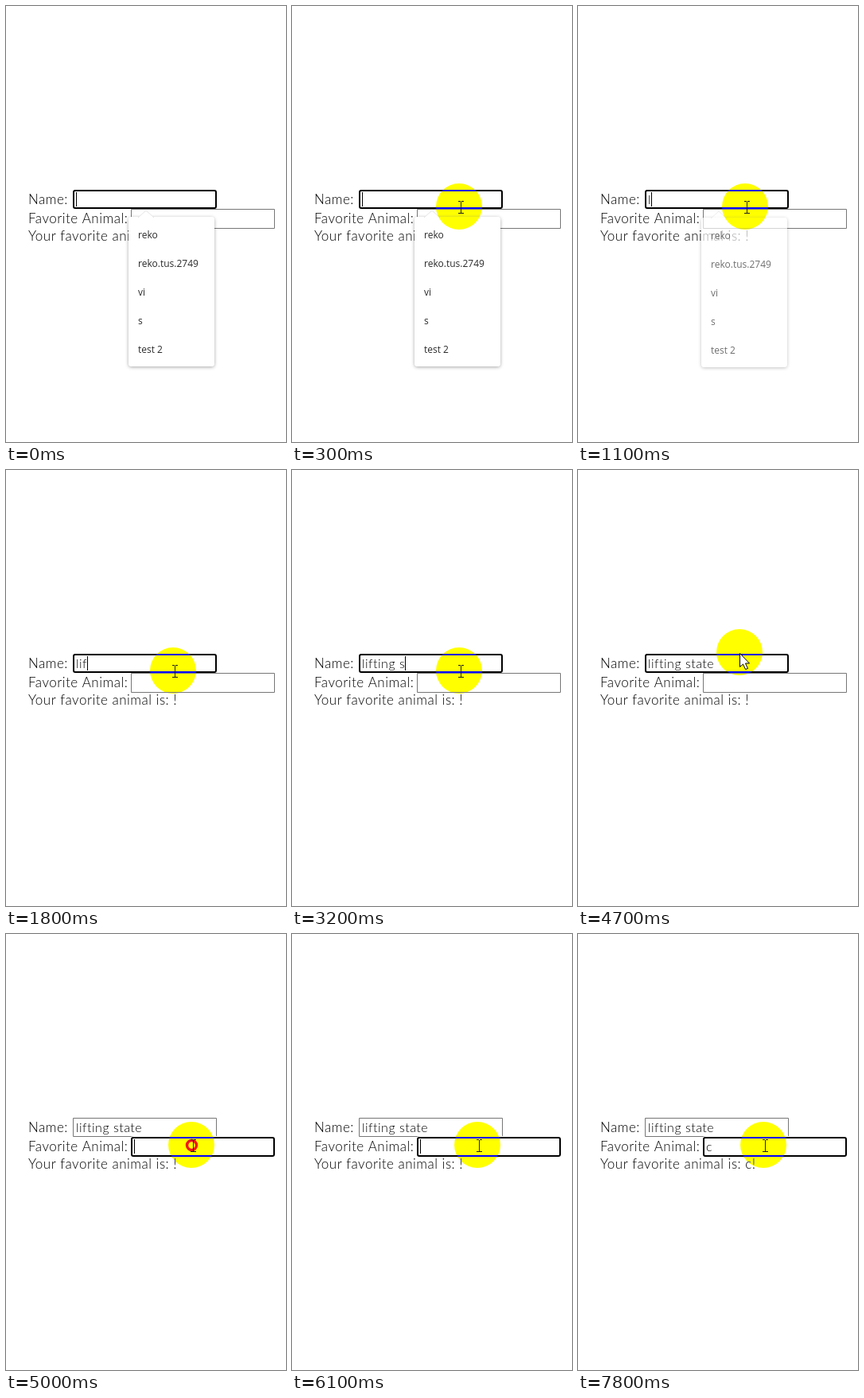
Write an HTML page with a canvas that moves like this. It is 352 by 548 pixels and loops after 8000 ms.

```html
<!DOCTYPE html>
<html lang="en">
<head>
<meta charset="utf-8">
<title>Two inputs</title>
<style>
html, body { margin: 0; height: 100%; overflow: hidden; background: #fff; }
canvas { display: block; }
</style>
</head>
<body>
<canvas id="stage" width="352" height="548"></canvas>
<script>
const ctx = document.getElementById('stage').getContext('2d');
const LOOP = 8000, STEP = 100, FOCUS_TIME = 4900;

const nameField = { x: 84, y: 231, w: 181, h: 24 };
const animalField = { x: 157, y: 255, w: 181, h: 25 };
const suggestions = ['reko', 'reko.tus.2749', 'vi', 's', 'test 2'];

// [time, typed text]
const nameKeys = [[0, ''], [1000, 'l'], [1600, 'li'], [1800, 'lif'], [2200, 'lift'], [2300, 'lifti'],
  [2500, 'liftin'], [2700, 'lifting'], [2800, 'lifting '], [3200, 'lifting s'], [3600, 'lifting st'],
  [3700, 'lifting sta'], [3800, 'lifting stat'], [4000, 'lifting state']];
const animalKeys = [[5000, ''], [7200, 'c']];

// [time, x, y] of the pointer highlight
const path = [[100, 213, 262], [200, 205, 249], [300, 210, 252], [4400, 210, 252], [4500, 190, 223],
  [4600, 190, 213], [4700, 203, 229], [4800, 224, 255], [4900, 233, 265]];

const latest = (keys, t) => keys.filter(k => k[0] <= t).pop();

function label(text, x, y, size = 17) {
  ctx.font = `300 ${size}px Lato, sans-serif`;
  ctx.letterSpacing = '0.5px';
  ctx.fillStyle = '#000';
  ctx.fillText(text, x, y);
  return ctx.measureText(text).width;
}

function frame({ x, y, w, h }, inset, width, radius, color) {
  ctx.lineWidth = width;
  ctx.strokeStyle = color;
  ctx.beginPath();
  ctx.roundRect(x + inset, y + inset, w - 2 * inset, h - 2 * inset, radius);
  ctx.stroke();
}

function field(box, keys, t, focused) {
  ctx.fillStyle = '#fff';
  ctx.fillRect(box.x, box.y, box.w, box.h);
  if (focused) {
    frame(box, -0.5, 1, 3, '#fff');
    frame(box, 1, 2, 2, '#000');
  } else {
    frame(box, 0.5, 1, 0, '#767676');
  }
  const [since, text] = latest(keys, t) || [0, ''];
  const width = label(text, box.x + 4, box.y + 18, 16);
  const caretOn = Math.floor((t - since) / 500) % 2 === 0;
  if (focused && caretOn) {
    ctx.fillStyle = '#000';
    ctx.fillRect(Math.floor(box.x + 4 + width), box.y + 3, 1, 18);
  }
}

// The shadow is kept outside the panel so that it does not show through while fading.
function popupShadow(panel) {
  const outside = new Path2D(panel);
  outside.rect(0, 0, 352, 548);
  ctx.save();
  ctx.clip(outside, 'evenodd');
  ctx.shadowColor = 'rgba(0,0,0,.35)';
  ctx.shadowBlur = 4;
  ctx.shadowOffsetY = 1;
  ctx.fill(panel);
  ctx.restore();
}

function popup(t) {
  const alpha = t < 1000 ? 1 : t < 1100 ? 0.87 : t < 1200 ? 0.68 : t < 1300 ? 0.3 : 0;
  if (!alpha) return;
  const panel = new Path2D();
  panel.roundRect(154, 265, 108, 188, 4);
  ctx.save();
  ctx.globalAlpha = alpha;
  if (t >= 1100) ctx.translate(1, 1);
  ctx.fillStyle = '#fff';
  popupShadow(panel);
  ctx.fill(panel);
  ctx.beginPath();
  ctx.moveTo(166, 266);
  ctx.lineTo(176, 257);
  ctx.lineTo(186, 266);
  ctx.fill();
  ctx.strokeStyle = '#e4e4e4';
  ctx.lineWidth = 1;
  ctx.stroke();
  ctx.font = '12px "Open Sans", sans-serif';
  ctx.letterSpacing = '0px';
  ctx.fillStyle = '#2b2b2b';
  suggestions.forEach((s, i) => ctx.fillText(s, 166, 292 + 36 * i));
  ctx.restore();
}

// Inverting blue turns white into yellow and black into blue.
function highlight(x, y) {
  ctx.globalCompositeOperation = 'difference';
  ctx.fillStyle = '#00f';
  ctx.beginPath();
  ctx.arc(x, y, 29, 0, 7);
  ctx.fill();
  ctx.globalCompositeOperation = 'source-over';
}

function arrow(x, y) {
  const shape = [[0, 0], [0, 17], [4, 13.5], [7, 20], [10, 19], [7, 12.5], [12, 12.5]];
  ctx.beginPath();
  shape.forEach(([dx, dy]) => ctx.lineTo(x + 0.5 + dx, y + 0.5 + dy));
  ctx.closePath();
  ctx.fillStyle = '#fff';
  ctx.fill();
  ctx.strokeStyle = '#000';
  ctx.lineWidth = 1;
  ctx.stroke();
}

function beam(x, y) {
  ctx.fillStyle = '#222';
  ctx.fillRect(x, y - 7, 1, 15);
  for (const end of [-8, 7]) {
    ctx.fillRect(x - 3, y + end, 3, 1);
    ctx.fillRect(x + 1, y + end, 3, 1);
  }
}

function clickRing(x, y, t) {
  const age = (t - FOCUS_TIME) / STEP;
  if (age < 0 || age > 3) return;
  ctx.globalAlpha = Math.min(1, 1.3 - age * 0.3);
  ctx.strokeStyle = '#f01818';
  ctx.lineWidth = 3.5;
  ctx.beginPath();
  ctx.arc(x + 0.5, y + 0.5, 3 + age * 3, 0, 7);
  ctx.stroke();
  ctx.globalAlpha = 1;
}

function draw(t) {
  const onAnimal = t >= FOCUS_TIME;
  ctx.fillStyle = '#fff';
  ctx.fillRect(0, 0, 352, 548);
  label('Name:', 28, 249);
  label('Favorite Animal:', 28, 273);
  label(`Your favorite animal is: ${t >= 7200 ? 'c' : ''}!`, 28, 295);
  field(nameField, nameKeys, t, !onAnimal);
  field(animalField, animalKeys, t, onAnimal);
  popup(t);

  const pointer = latest(path, t);
  if (!pointer) return;
  const [, x, y] = pointer;
  highlight(x, y);
  clickRing(x, y, t);
  if (t < 200 || y < 231) arrow(x, y + 1);
  else beam(x + 2, y + 1);
}

function tick(now) {
  draw(Math.floor((now % LOOP) / STEP) * STEP);
  requestAnimationFrame(tick);
}
requestAnimationFrame(tick);
</script>
</body>
</html>
```
